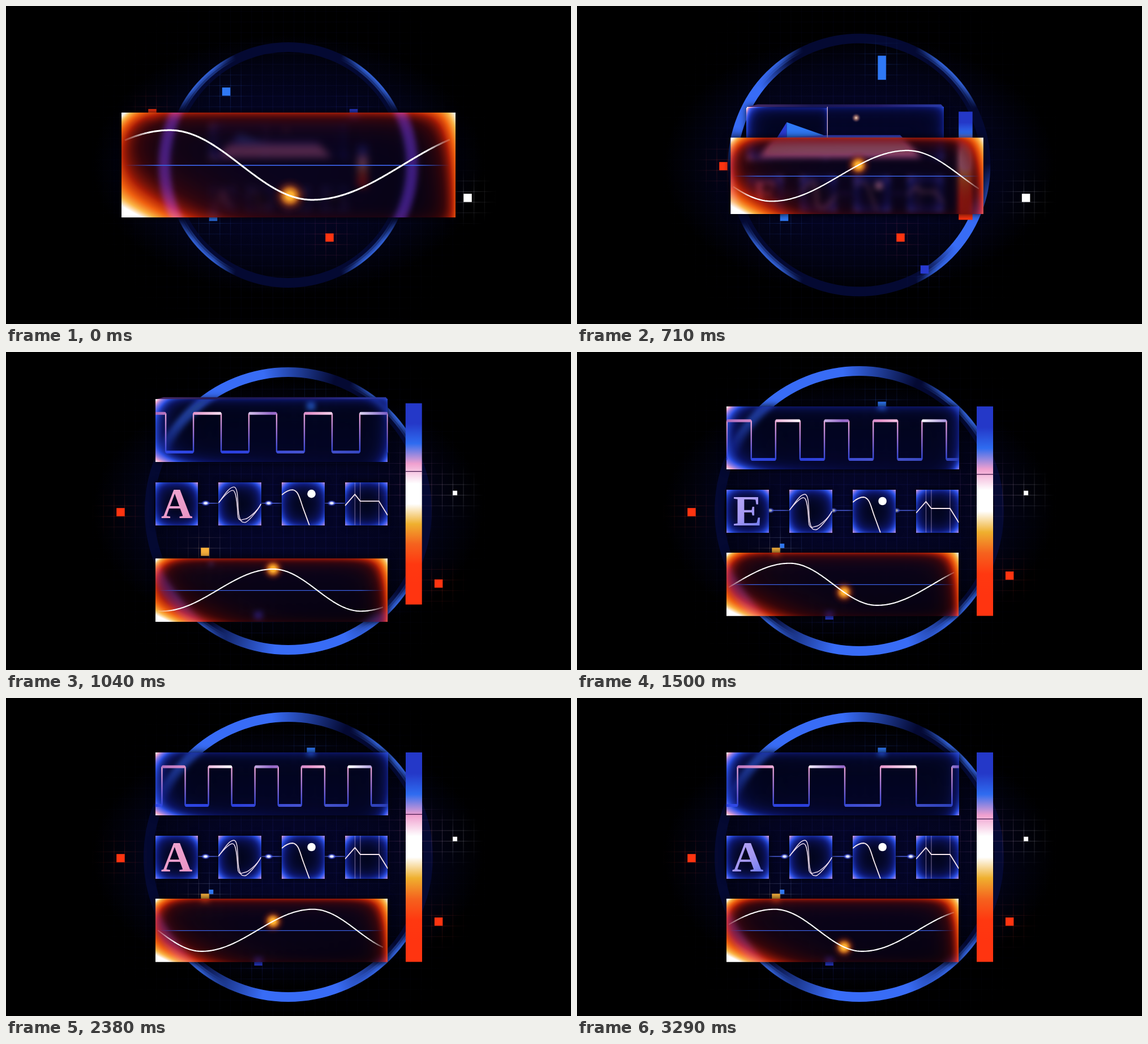
Write an HTML page with a canvas that moves like this. It is 998x561 px and loops after 3.33 s.

```html
<!DOCTYPE html>
<html lang="en">
<head>
<meta charset="utf-8">
<title>Signal panels</title>
<style>
html, body { margin: 0; width: 100%; height: 100%; overflow: hidden; background: #000; }
canvas { display: block; }
</style>
</head>
<body>
<canvas id="stage" width="998" height="561"></canvas>
<script>
const cv = document.getElementById('stage');
const c = cv.getContext('2d');
const copy = document.createElement('canvas');
copy.width = cv.width;
copy.height = cv.height;
const back = copy.getContext('2d');
const TAU = Math.PI * 2, LOOP = 3330, FPS = 24, FRAMES = 80;
const CX = 498.5, CY = 280.5, CELL = 18.7;

const mix = (a, b, u) => a + (b - a) * u;
const wrap = u => u - Math.floor(u);
const clamp = u => Math.max(0, Math.min(1, u));

// Cubic ease-in-out from 0 to 1 while k runs from a to b
function ease(k, a, b) {
  const u = clamp((k - a) / (b - a));
  return u < .5 ? 4 * u ** 3 : 1 - 4 * (1 - u) ** 3;
}
const hump = (k, a, b) => Math.sin(Math.PI * clamp((k - a) / (b - a)));

let seed = 7;
const random = () => (seed = seed * 16807 % 2147483647) / 2147483647;

function stops(g, colors) {
  colors.forEach((s, i) => g.addColorStop(i / (colors.length - 1), s));
  return g;
}
const lin = (x0, y0, x1, y1, colors) => stops(c.createLinearGradient(x0, y0, x1, y1), colors);
const rad = (x, y, r, colors) => stops(c.createRadialGradient(x, y, 0, x, y, r), colors);

function scoped(draw) { c.save(); draw(); c.restore(); }

function trace(pts) {
  c.beginPath();
  pts.forEach(([x, y]) => c.lineTo(x, y));
}
function line(pts, style, width) {
  trace(pts);
  c.strokeStyle = style;
  c.lineWidth = width;
  c.stroke();
}
function poly(pts, style) {
  trace(pts);
  c.fillStyle = style;
  c.fill();
}
function circle(x, y, r, style, width) {
  c.beginPath();
  c.arc(x, y, r, 0, TAU);
  c.strokeStyle = c.fillStyle = style;
  c.lineWidth = width || 1;
  if (width) c.stroke(); else c.fill();
}
function clipRect(x, y, w, h) {
  c.beginPath();
  c.rect(x, y, w, h);
  c.clip();
}

// Glowing pane: heat(left, top, right, bottom) lists the lights that reach a pixel
const hex = s => [0, 2, 4].map(i => parseInt(s.substr(i, 2), 16));
const FIRE = ['0b0412', '4a0708', 'b01e06', 'f0600f', 'fbb445', 'ffffff'].map(hex);
const ICE = ['02041c', '101c80', '2b50e8', '8a7ce6', 'f5a8cc', 'ffffff'].map(hex);
const fade = d => Math.exp(-d);

function pane(w, h, ramp, floor, heat) {
  const el = document.createElement('canvas');
  el.width = w;
  el.height = h;
  const g = el.getContext('2d'), img = g.createImageData(w, h);
  for (let o = 0; o < w * h; o++) {
    const x = o % w, y = Math.floor(o / w);
    const v = 1 - heat(x, y, w - x, h - y).reduce((dark, a) => dark * (1 - clamp(a)), 1);
    const q = v * (ramp.length - 1), i = Math.min(ramp.length - 2, Math.floor(q));
    ramp[i].forEach((a, j) => { img.data[4 * o + j] = mix(a, ramp[i + 1][j], q - i); });
    img.data[4 * o + 3] = 255 * mix(floor, 1, clamp(v * 2.2));
  }
  g.putImageData(img, 0, 0);
  return el;
}

const firePane = pane(590, 185, FIRE, .5, (l, t, r, b) => [
  1.5 * fade(l / 90 + b / 50), 1.2 * fade((l + t) / 26), fade(r / 28 + t / 60),
  .38 * fade(t / 18), .28 * fade(l / 24), .5 * fade(r / 20), .1 * fade(b / 10)]);
const icePane = pane(411, 111, ICE, .5, (l, t, r, b) => [
  .36 * fade(l / 20), fade((l + t) / 13), fade(l / 26 + b / 12),
  .34 * fade(l / 160 + b / 11), .2 * fade(t / 10), .26 * fade(r / 13), .55 * fade((r + b) / 14)]);
const tiles = Array.from({ length: 4 }, () => {
  const [tl, tr, bl, br] = Array.from({ length: 4 }, () => .25 + .4 * random());
  return pane(76, 76, ICE, .8, (l, t, r, b) => [
    .26 * fade(Math.min(l, r) / 10), .24 * fade(Math.min(t, b) / 10),
    tl * fade((l + t) / 12), tr * fade((r + t) / 12), bl * fade((l + b) / 12), br * fade((r + b) / 12)]);
});

const grid = new Path2D();
for (let i = -14; i < 29; i++) {
  const x = 340.5 + CELL * i, y = 271.3 + CELL * (i - 7);
  grid.moveTo(x, 0);
  grid.lineTo(x, 561);
  grid.moveTo(0, y);
  grid.lineTo(998, y);
}

function gridGlow(x, y, r, rgb, a) {
  c.lineWidth = 1;
  c.strokeStyle = rad(x, y, r, [`rgba(${rgb},${a})`, `rgba(${rgb},${a * .4})`, `rgba(${rgb},0)`]);
  c.stroke(grid);
}

function backdrop() {
  c.fillStyle = '#000';
  c.fillRect(0, 0, 998, 561);
  scoped(() => {
    c.translate(CX, CY);
    c.scale(1, .67);
    circle(0, 0, 345, rad(0, 0, 345, ['#04062a', '#040526', '#03041f', '#020314', '#000']));
  });
  gridGlow(CX, CY, 365, '34,36,140', .28);
}

// Ring light centred on an angle and fading out to both sides
function light(deg, half, r, width, rgb, a) {
  const g = c.createConicGradient((deg - 180) * TAU / 360, CX, CY);
  for (let i = -6; i <= 6; i++) {
    g.addColorStop(.5 + half / 360 * i / 6, `rgba(${rgb},${a * clamp(1.5 * (1 - Math.abs(i) / 6))})`);
  }
  circle(CX, CY, r, g, width);
}

const ringR = k => mix(216.5, 255.5, ease(k, 5, 31));

function ring(k) {
  const R = ringR(k), turn = ease(k, 14, 29);
  circle(CX, CY, R - 8.5, '#040932', 17);
  for (let deg = 45; deg < 360; deg += 90) {
    for (const w of [10, 6, 3]) light(deg, 19, R - w / 2, w, '62,120,255', .38);
  }
  const a = ease(k, 8, 17), half = mix(30, 46, turn);
  light(mix(206, 248, turn), half, R - 8.5, 17, '56,108,246', a);
  light(mix(28, 85, turn), half, R - 8.5, 17, '56,108,246', a);
}

// Each square makes two moves of whole or part cells, one per axis
const square = (rgb, x, y, dx, dy, start, yFirst, size = 14.5) => ({ rgb, x, y, dx, dy, start, yFirst, size });
const squares = [
  square('47,120,245', 389, 151, 8, -3, 9),
  square('255,52,16', 258.5, 189, -3, 5, 13, true),
  square('40,58,208', 614, 189, -9, 14.75, 13, true),
  square('255,255,255', 815.5, 338.5, -1.2, -4.8, 13, false, 8),
  square('47,120,245', 366, 372, -.2, -1.6, 19, false, 8),
  square('255,52,16', 571.5, 408.5, 10.3, -.75, 19)
];

function place(q, k) {
  const first = ease(k, q.start, q.start + 2), second = ease(k, q.start + 6, q.start + 8);
  return [q.x + CELL * q.dx * (q.yFirst ? second : first), q.y + CELL * q.dy * (q.yFirst ? first : second)];
}

function drawSquare(rgb, [x, y], [px, py], s) {
  gridGlow(x, y, 52, rgb, .24);
  c.fillStyle = `rgb(${rgb})`;
  c.fillRect(Math.min(x, px) - s / 2, Math.min(y, py) - s / 2, Math.abs(x - px) + s, Math.abs(y - py) + s);
}

function drawSquares(k) {
  for (const q of squares) drawSquare(q.rgb, place(q, k), place(q, k - 1), mix(14.5, q.size, ease(k, 18, 22)));
  const s = 14.5 * ease(k, 19, 23), spot = [351.5, 352.5];
  if (s) drawSquare('250,178,60', spot, spot, s);
}

// Dark pane showing a blurred copy of what lies behind it
function glass(x, y, w, h, blur, tint) {
  back.drawImage(cv, 0, 0);
  scoped(() => {
    c.shadowColor = 'rgba(0,0,0,.9)';
    c.shadowBlur = 12;
    c.fillStyle = '#000';
    c.fillRect(x, y, w, h);
  });
  scoped(() => {
    clipRect(x, y, w, h);
    c.filter = `blur(${blur}px) brightness(1.3)`;
    c.drawImage(copy, 0, 0);
    c.filter = 'none';
    c.globalCompositeOperation = 'multiply';
    c.fillStyle = tint;
    c.fillRect(x, y, w, h);
  });
}

// Half period shrinks steadily, then springs back
function halfPeriod(k) {
  const p = wrap((k - 50) / FRAMES);
  return 35.5 + 32.5 * (p < .25 ? ease(p, 0, .25) : (1 - p) / .75);
}

function squareWave(k, w, h) {
  const half = halfPeriod(k), hi = h * .225, lo = h * .84;
  const top = lin(0, 0, w, 0, ['#a668bc', '#e696cc', '#ffffff', '#9468c8', '#e896cc', '#ffffff', '#7a5cc6']);
  const side = lin(0, hi, 0, lo, ['#f0a8d4', '#9a70d4', '#2f45da']);
  const base = lin(0, 0, w, 0, ['#2f49e6', '#2b3fdc', '#4a55cc', '#2b3fb8']);
  const start = 231.7 - .355 * half;
  for (let x = start - 8 * half; x < w + half; x += 2 * half) {
    line([[x - half, hi], [x - half, lo]], side, 2.4);
    line([[x, hi], [x, lo]], side, 2.4);
    c.lineCap = 'round';
    line([[x - half + 2, hi], [x - 2, hi]], top, 5);
    line([[x + 2, lo], [x + half - 2, lo]], base, 5);
    c.lineCap = 'butt';
  }
}

function topPanel(k, s, y, alpha) {
  const w = 411 * s, h = 111 * s, x = 499 - 235.3 * s, t = y - h / 2;
  const depth = 5 * hump(k, 8, 31);
  glass(x, t, w, h, 4, '#fff');
  scoped(() => {
    c.globalAlpha = alpha;
    poly([[x, t], [x + depth * 4, t - depth], [x + w - depth, t - depth], [x + w, t]],
      lin(x, 0, x + w, 0, ['#4a2c68', '#1b1750', '#241c66', '#2a3aa8']));
    c.drawImage(icePane, x, t, w, h);
    clipRect(x, t, w, h);
    c.globalAlpha = alpha * ease(k, 17, 22);
    c.translate(x, t);
    c.scale(s, s);
    squareWave(k, 411, 111);
  });
}

// Folded shape that shows while the panels open
function prism(k, s, y, alpha) {
  scoped(() => {
    c.globalAlpha = alpha * (1 - ease(k, 17, 22));
    c.translate(499, y);
    c.scale(s, s);
    c.drawImage(icePane, -236, -53, 169, 107);
    poly([[-152, -24], [-172, 8], [-152, 8]], '#2a3bd4');
    poly([[-152, -24], [-152, 8], [-67, 8], [-67, 6]], '#2f78f5');
    poly([[-180, 9], [-67, 3], [85, 3], [130, 50], [-210, 50]],
      lin(0, 3, 0, 50, ['#2a3bd4', '#e2b4e4', '#f2c0dc', '#c89ae0']));
    line([[-67, -56], [-67, 9]], '#e9c3dc', 1.4);
    circle(-7, -33, 10, rad(-7, -33, 10, ['#ffd9c0', 'rgba(180,120,110,.6)', 'rgba(60,40,80,0)']));
  });
}

const tileArt = [
  k => {
    const n = Math.floor((k + 2) / 12);
    c.fillStyle = lin(20, 10, 62, 65, n % 3 ? ['#f3a6d2', '#e694c4'] : ['#b4a6f6', '#a497f2', '#6f7df0']);
    c.font = 'bold 77px "Liberation Serif", "Noto Serif", serif';
    c.textAlign = 'center';
    c.fillText(n % 2 ? 'E' : 'A', 38, 63);
  },
  () => {
    c.strokeStyle = '#f3e2f2';
    c.lineWidth = 1.4;
    for (const i of [0, 6]) {
      const top = 8 + i, low = 70.5 - i, x = 27 - i / 3;
      c.stroke(new Path2D(`M0 36C8 26 18 ${top} ${x} ${top}S33 42 ${x + 9} 57S43 ${low} 47 ${low}S68 52 75 38`));
    }
  },
  () => {
    c.strokeStyle = '#fbeef2';
    c.lineWidth = 1.8;
    c.stroke(new Path2D('M0 22C8 15 15 13 19 13C30 14 32 30 38 46L49 76'));
    circle(52.5, 20, 7.3, '#fff');
  },
  () => {
    for (const x of [17.5, 27, 60]) line([[x, 0], [x, 76]], 'rgba(205,180,225,.6)', 1);
    line([[0, 41], [17.5, 21], [27, 33], [60, 33], [75.5, 58]], '#f8e8ef', 1.8);
  }
];

function row(k, s, y, alpha) {
  scoped(() => {
    c.globalAlpha = alpha;
    c.translate(499, y);
    c.scale(s, s);
    const run = 2.4 * (k % 16 - 4);
    for (let i = 0; i < 3; i++) {
      const x = -159.5 + 111.4 * i;
      line([[x, -1.5], [x + 36.5, -1.5]], '#4c5fdc', 1.5);
      if (run < 0) continue;
      scoped(() => {
        c.translate(x + run + 1, -1.5);
        c.scale(1, .65);
        circle(0, 0, 8, rad(0, 0, 8, ['#fff', '#dfe4ff', 'rgba(80,100,255,.6)', 'rgba(40,60,255,0)']));
      });
    }
    tiles.forEach((img, i) => scoped(() => {
      c.translate(-235.5 + 111.8 * i, -38);
      c.shadowColor = 'rgba(0,0,0,.9)';
      c.shadowBlur = 10;
      c.fillStyle = '#01020c';
      c.fillRect(0, 0, 75.5, 75.5);
      c.shadowColor = 'transparent';
      c.drawImage(img, 0, 0, 75.5, 75.5);
      clipRect(0, 0, 75.5, 75.5);
      tileArt[i](k);
    }));
  });
}

function bar(k, s, kick, alpha) {
  const open = ease(k, 5, 31);
  const top = mix(245, 96, open) - kick, end = mix(320, 465.5, open) - kick;
  const x = 499 + 207 * s, w = 29 * s;
  scoped(() => {
    c.globalAlpha = alpha;
    gridGlow(x + w / 2, mix(top, end, .4), 75 * s, '255,140,170', .25 * ease(k, 17, 24));
    c.fillStyle = lin(0, top, 0, end, ['#2438c8', '#2438c8', '#2f6cf0', '#f0a0cf', '#fff', '#fff',
      '#efb02f', '#f5621e', '#ff3810', '#ff3410', '#ff3410']);
    c.fillRect(x, top, w, end - top);
    c.globalAlpha = ease(k, 18, 22);
    const m = top + 115 + 6 * Math.cos((k - 30) * TAU / 60);
    line([[x, m], [x + w, m]], '#4a1c50', 1.3);
  });
}

function firePanel(k, lift, kick) {
  const open = ease(k, 5, 24);
  const w = mix(590, 410.5, open), h = mix(185, 111.7, ease(k, 5, 26)), z = w / 411;
  const cx = mix(499, 469.2, lift), cy = mix(280.5, 409.8, lift) + .8 * kick;
  const x = cx - w / 2, y = cy - h / 2;
  glass(x, y, w, h, 5 * z, '#ff9fc0');
  scoped(() => {
    clipRect(x, y, w, h);
    c.drawImage(firePane, x, y, w, h);
    scoped(() => {
      c.globalCompositeOperation = 'screen';
      c.globalAlpha = mix(.8, .45, open);
      c.filter = 'blur(5px)';
      circle(CX, CY, ringR(k) * 1.02 - 2, '#43208c', 20);
    });

    const x0 = x + w * .01, x1 = x + w * .983;
    const blue = Array(9).fill('#3a60e2');
    line([[x0, cy + .6], [x1, cy + .6]], lin(x0, 0, x1, 0, ['#3a60e200', ...blue, '#3a60e200']), 1.2 * z);

    // Travelling wave with a quicker fall than rise
    const period = z * mix(398, 352, ease(k, 14, 25)), fall = .44;
    const peak = cx - period * (.367 + k / 40);
    const wave = px => {
      const u = wrap((px - peak) / period);
      const a = u < fall ? u / fall : 1 + (u - fall) / (1 - fall);
      return cy - h * .332 * Math.cos(Math.PI * a);
    };
    const bx = cx + 2.5, by = wave(bx), br = 23 * z;
    circle(bx, by, br, rad(bx, by, br, ['#ffbf3c', '#faa92c', 'rgba(232,125,30,.75)',
      'rgba(190,70,20,.35)', 'rgba(140,30,10,.12)', 'rgba(120,20,10,0)']));

    const pts = [];
    for (let px = x0; px <= x1; px += 2) pts.push([px, wave(px)]);
    const white = Array(12).fill('#fff'), edge = 'rgba(255,240,235,.15)';
    line(pts, lin(x0, 0, x1, 0, [edge, ...white, edge]), 2.1 * z);
  });
}

function render(k) {
  const s = mix(.59, 1, ease(k, 5, 27)), alpha = mix(.5, 1, ease(k, 6, 17));
  const lift = ease(k, 13, 25), kick = 13 * hump(k, 20, 31);
  const topY = mix(238, 151.7, lift) - kick;
  backdrop();
  ring(k);
  drawSquares(k);
  topPanel(k, s, topY, alpha);
  prism(k, s, topY, alpha);
  row(k, s, mix(341, 281, lift) - kick, alpha);
  bar(k, s, kick, alpha);
  firePanel(k, lift, kick);
}

const start = performance.now();
let shown = -1;
function tick() {
  const t = (performance.now() - start) % LOOP;
  const k = Math.min(FRAMES - 1, Math.floor((t + 2) * FPS / 1000));
  if (k !== shown) render(shown = k);
  requestAnimationFrame(tick);
}
tick();
</script>
</body>
</html>
```
